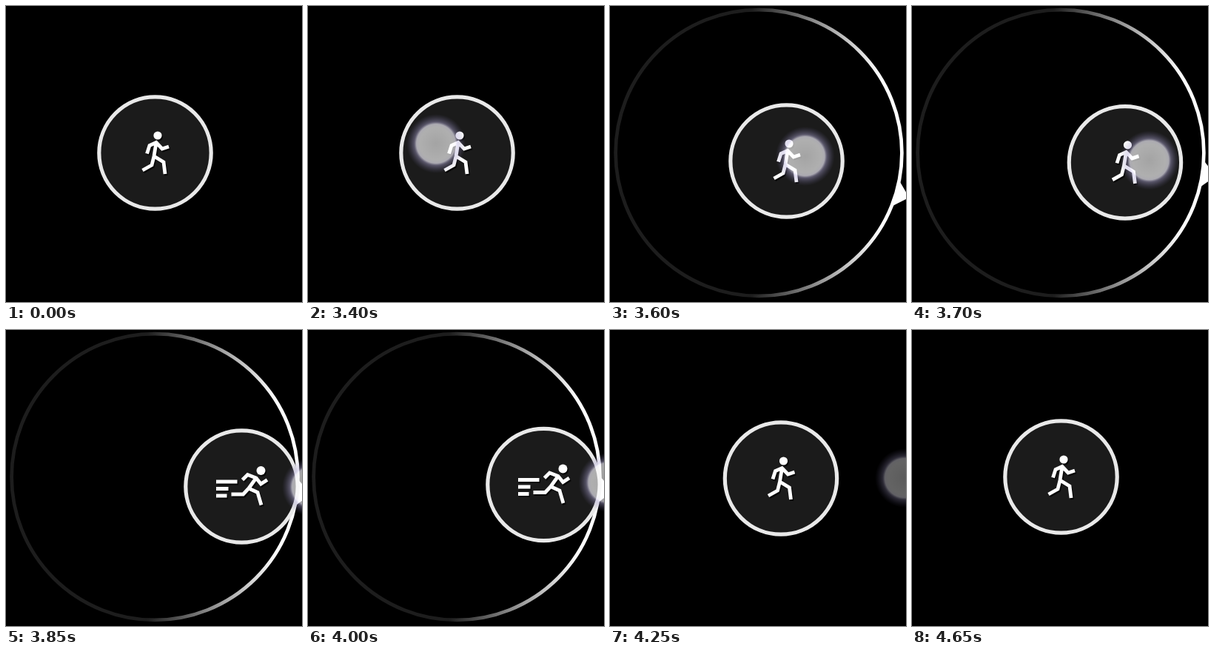
An HTML page for the animation above (4.9 s loop, 400 by 400 pixels).

```html
<!DOCTYPE html>
<html lang="en">
<head>
<meta charset="utf-8">
<title>Joystick</title>
<style>
  html, body { margin: 0; width: 100%; height: 100%; overflow: hidden; background: #000; }
  svg { display: block; width: 100vw; height: 100vh; }
  .man { fill: none; stroke: currentColor; stroke-width: 4.8; }
  .head { fill: currentColor; stroke: none; }
</style>
</head>
<body>
<svg viewBox="0 0 400 400">
  <defs>
    <linearGradient id="sweep" gradientUnits="userSpaceOnUse" x1="-10" y1="0" x2="165" y2="0">
      <stop offset="0" stop-color="#1d1d1d"/>
      <stop offset=".12" stop-color="#3a3a3a"/>
      <stop offset="1" stop-color="#fff"/>
    </linearGradient>
    <radialGradient id="glow">
      <stop offset="0" stop-color="#fff" stop-opacity=".6"/>
      <stop offset=".55" stop-color="#fff" stop-opacity=".65"/>
      <stop offset=".66" stop-color="#f6f4ff" stop-opacity=".66"/>
      <stop offset=".74" stop-color="#b4acdc" stop-opacity=".4"/>
      <stop offset="1" stop-color="#6a6298" stop-opacity="0"/>
    </radialGradient>
    <g id="walk" class="man">
      <circle class="head" cx="3.5" cy="-23.5" r="5.6"/>
      <path d="M-11 1L-7.5-10L1.5-14L9.5-5.5L18.5-8.5M1.5-14L-1.5 4.5L-4.5 16.5L-17 23.5M-1.5 4.5L11.5 12.5L13.5 28.5"/>
    </g>
    <g id="run" class="man">
      <circle class="head" cx="26" cy="-21.5" r="6"/>
      <path d="M1-9L8-16L19.5-11.5L26-3.5L34.5-9M19.5-11.5L9.5 2.5L2 10.5H-14M9.500 2.500L21.500 8L26.500 25"/>
      <path d="M-34.500-6.500H-6M-34.500 3H-18M-34.500 12.500H-20"/>
    </g>
  </defs>
  <rect width="400" height="400"/>
  <g id="dial" transform="translate(201 198.5)">
    <circle r="193.4" fill="none" stroke="url(#sweep)" stroke-width="4.7"/>
    <path id="arrow" d="M194-17L212 0L194 17Z" fill="#fff"/>
  </g>
  <g id="knob">
    <circle r="75.7" fill="#1b1b1b" stroke="#e9e9e9" stroke-width="5.2"/>
    <use class="icon" color="#000" opacity=".7" transform="translate(1.5 2)"/>
    <use class="icon" color="#fff"/>
  </g>
  <circle id="touch" r="40" fill="url(#glow)"/>
</svg>
<script>
const LOOP = 4900, STEP = 50;
const PRESS = 3400, GRAB = 3450, EDGE = 3750, HOLD = 3850, RELEASE = 4150, GONE = 4400;
const HOME = { x: 201.5, y: 198.5 }, REACH = 117;

const pick = id => document.getElementById(id);
const dial = pick('dial'), arrow = pick('arrow'), knob = pick('knob'), touch = pick('touch');
const icons = document.querySelectorAll('.icon');

const span = (t, from, to) => Math.min(1, Math.max(0, (t - from) / (to - from)));
const easeOut = (p, power) => 1 - (1 - p) ** power;
const move = (el, x, y) => el.setAttribute('transform', `translate(${x} ${y})`);

function draw(time) {
  const t = Math.floor((time % LOOP) / STEP) * STEP;
  const swipe = span(t, PRESS, HOLD);
  const pull = span(t, GRAB, EDGE);
  const drift = span(t, HOLD, RELEASE);
  const back = span(t, RELEASE, GONE);
  const dragging = pull > 0 && back === 0;

  // the knob trails the finger to the rim, then springs home
  const rest = (1 - back) ** 2.7;
  const dx = REACH * pull ** 1.66 * rest;
  const dy = (13 * easeOut(pull, 2.7) - 5 * drift) * rest;
  move(knob, HOME.x + dx, HOME.y + dy);

  arrow.setAttribute('transform', `rotate(${Math.atan2(dy, dx) * 180 / Math.PI})`);
  dial.setAttribute('visibility', dragging ? 'visible' : 'hidden');
  const name = dragging && pull === 1 ? '#run' : '#walk';
  icons.forEach(icon => icon.setAttribute('href', name));

  move(touch, 173 + 240 * swipe ** 1.2 - 15 * drift,
    186 + 26 * easeOut(swipe, 1.8) - 12 * drift);
  touch.setAttribute('opacity', t >= PRESS ? 1 - back : 0);
}

const start = performance.now();
function tick() {
  draw(performance.now() - start);
  requestAnimationFrame(tick);
}
tick();
</script>
</body>
</html>
```
